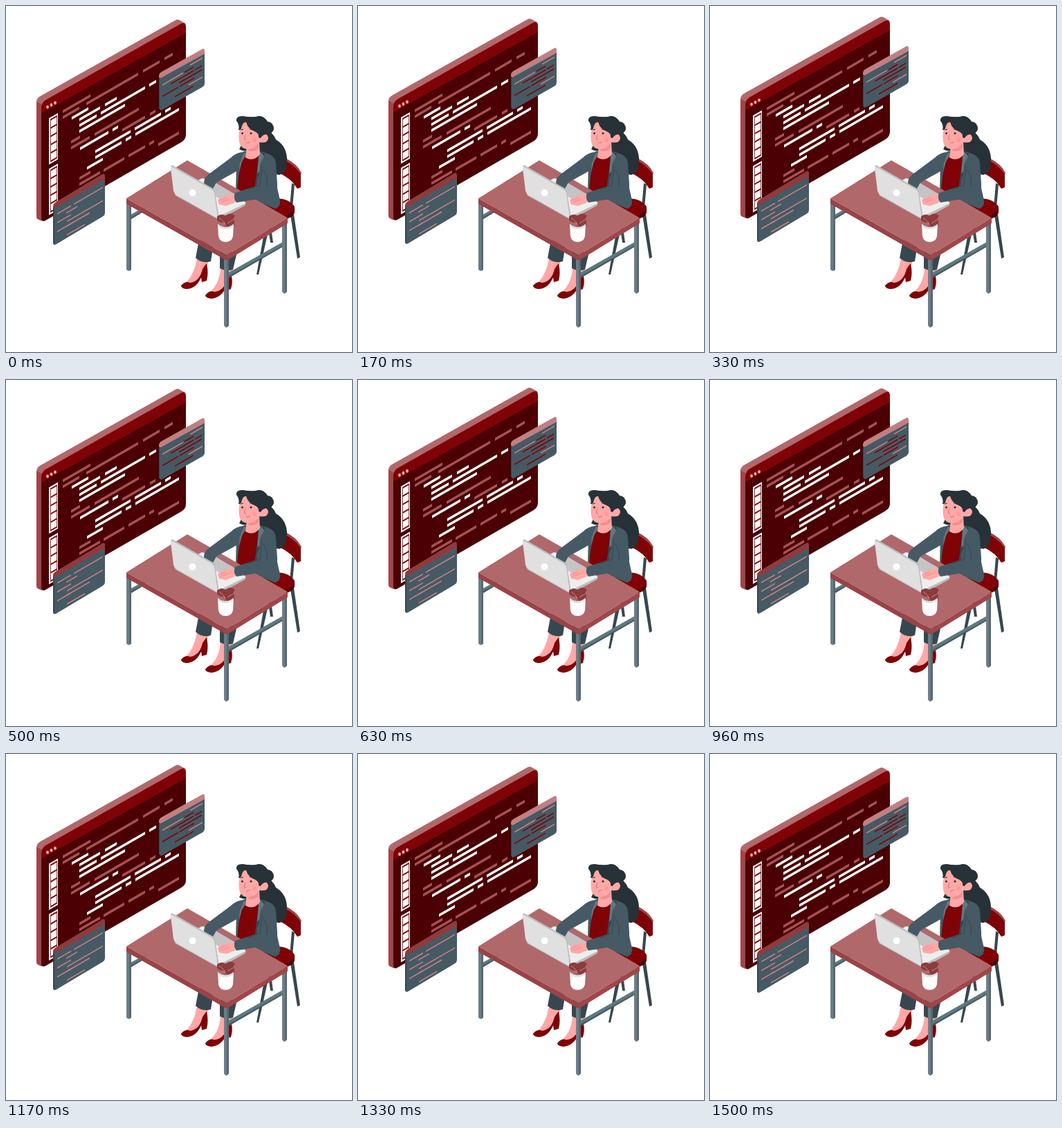
Recreate the animation shown at these times as an HTML page. Size 500 px wide and 500 px high, loop 1540 ms.

```html
<!DOCTYPE html>
<html lang="en">
<head>
<meta charset="utf-8">
<style>
html, body { margin: 0; width: 100%; height: 100%; overflow: hidden; background: #fff; }
svg { display: block; width: 100vw; height: 100vh; }
</style>
</head>
<body>
<svg viewBox="0 0 500 500">
  <g id="screens">
    <path fill="#b0686b" d="M44 139Q44 133 50 130L244 21Q248 18 252 21L259 25L255 40L52 160V311L46 308Q44 307 44 303Z"/>
    <path fill="#a04649" d="M44 138L51 142V310L46 308Q44 307 44 303Z"/>
    <path fill="#4b0003" d="M51 150L260 36V186Q260 193 253 197L57 310Q51 313 51 306Z"/>
    <path fill="#7f0306" d="M51 155V147Q51 140 57 136L252 26Q260 22 260 30V39Z"/>
    <g fill="#e8b9b9"><ellipse cx="60" cy="146" rx="1.9" ry="2.4"/><ellipse cx="65.5" cy="143" rx="1.9" ry="2.4"/><ellipse cx="71" cy="140" rx="1.9" ry="2.4"/></g>
    <g id="tiles"></g>
    <g id="code"></g>
    <path fill="#c17f81" d="M221 101Q221 97 225 95L284 62Q287 61 287 65V70L221 107Z"/>
    <path fill="#37474f" d="M221 103L223 104V150L221 148Z"/>
    <path fill="#455a64" d="M222 105L287 69V112Q287 115 284 117L226 150Q222 152 222 148Z"/>
    <g id="noteRight"></g>
    <path fill="#8e3b3e" d="M68 294V289Q68 286 71 284L139 243Q143 241 143 246V252Z"/>
    <path fill="#455a64" d="M69 293L143 250V299Q143 302 140 304L73 344Q68 347 68 341Z"/>
    <path fill="#37474f" d="M68 290L70 292V345L68 342Z"/>
    <g id="noteLeft"></g>
  </g>

  <g id="chair">
    <path fill="#37474f" d="M373 328L378 330L365 388H362ZM379 320L383 320L386 342H382ZM411 302L416 301L425 363L421 365ZM413 256L417 258L414 291H410Z"/>
    <path fill="#7f0306" d="M383 279Q407 275 417 290V297Q408 309 391 307L360 292Z"/>
    <path fill="#5a0205" d="M417 291V299Q414 307 402 308L399 304Q412 303 417 291Z"/>
    <path fill="#a04649" d="M402 219Q420 227 427 241L424 248L397 228Z"/>
    <path fill="#7f0306" d="M399 222Q416 228 426 243V262L421 264Q413 250 396 242Z"/>
  </g>

  <g id="legs">
    <path fill="#ffa8a7" d="M276 365L293 366Q290 383 280 396L267 402L260 400Q272 388 276 365ZM310 377L328 378Q326 395 317 409L303 416L295 413Q309 401 310 377Z"/>
    <path fill="#37474f" d="M279 338L300 344L296 369Q284 373 274 364ZM309 355L334 355L328 381Q317 384 309 379Z"/>
    <path fill="#7f0306" d="M253 404Q259 397 266 400Q280 398 284 380Q288 374 290 372Q293 386 290 397L283 399L282 392Q275 409 260 409Q253 408 253 404ZM288 418Q294 410 301 413Q315 412 320 394L326 390Q328 400 325 409L319 411L318 406Q312 421 297 423Q288 422 288 418Z"/>
  </g>

  <g id="body">
    <path fill="#263238" d="M372 176Q386 182 390 193Q407 203 406 225Q406 241 395 244Q374 242 364 223L356 190ZM339 193Q341 202 337 207Q343 211 352 208Z"/>
    <path fill="#455a64" d="M343 210Q352 207 367 210Q385 213 389 224L390 254L396 281Q397 290 389 293L332 268L333 226Z"/>
    <path fill="#7f0306" d="M343 217Q354 224 365 217L361 260L357 282L334 270Q335 240 343 217Z"/>
    <path fill="#37474f" d="M367 210L375 214L370 237L363 250L362 280L385 293L357 282L361 250Z"/>
    <path fill="#637780" d="M366 209L374 218L370 236L363 242L365 218ZM344 211L338 222L337 240L341 225L347 215Z"/>
    <path fill="#ffa8a7" d="M348 202L366 195L367 214Q358 226 346 219Z"/>
    <path fill="#f08f8f" d="M350 207Q361 205 365 199V205Q359 212 350 209Z"/>
    <path fill="#ffa8a7" d="M340 171Q335 184 337 196Q339 207 350 207Q362 205 366 197Q379 199 379 190Q377 183 370 185L367 170Q351 161 340 171Z"/>
    <path fill="#263238" d="M333 166Q332 159 342 159Q352 161 361 160Q371 156 378 167Q387 168 387 178Q386 182 380 186Q372 184 368 191L365 190Q366 184 359 181Q350 178 347 168Q342 167 340 177Q338 180 336 179Q338 172 333 166Z"/>
    <g fill="#263238"><circle cx="341.5" cy="184" r="1.5"/><circle cx="354" cy="184" r="1.6"/></g>
    <path fill="none" stroke="#263238" d="M339 179L343 178M352 178Q355 177 358 180"/>
    <path fill="none" stroke="#d96f70" d="M346 186L344 192L347 193M347 198Q350 199 353 196"/>
    <circle cx="359" cy="194" r="3" fill="#ff8d8e" opacity=".55"/>
  </g>

  <g id="desk">
    <path fill="#607780" d="M181 301L201 290V294L181 306ZM322 385L400 341V347L322 391Z"/>
    <path fill="#455a64" d="M181 305L201 294V296L181 308ZM322 390L400 346V348L322 393Z"/>
    <path fill="#6b7e87" d="M174 284H181V381L177 383L174 381ZM315 362H322V462L318 465L315 462ZM399 314H406V413L402 416L399 413Z"/>
    <path fill="#566a73" d="M178 286H181V381L178 383ZM319 364H322V462L319 464ZM403 312H406V413L403 415Z"/>
    <path fill="#b0686b" d="M174 278L262 223L407 306L319 360Z"/>
    <path fill="#9a4346" d="M174 278L319 360V368L174 286Z"/>
    <path fill="#a04649" d="M319 360L407 306V314L319 368Z"/>
  </g>

  <g id="laptop">
    <path fill="#eee" d="M244 272L281 250Q284 248 287 250L345 283Q348 285 345 287L306 306Z"/>
    <path fill="#bdbdbd" d="M306 305L346 285V288L308 309L304 307Z"/>
    <path fill="#c4c4c4" d="M280 261L297 252L331 272L314 282Z"/>
    <path fill="#ffa8a7" d="M289 249L298 254L300 263L293 267L286 260Z"/>
    <path fill="#455a64" d="M344 211Q333 211 324 220L293 243Q285 249 286 259L299 264L304 255L333 239Z"/>
    <path fill="#ffa8a7" d="M333 273L321 273Q309 276 306 281L308 287L318 289L331 284Z"/>
    <path fill="none" stroke="#e98384" stroke-width=".8" d="M309 281L318 277M311 284L322 279"/>
    <path fill="#455a64" d="M375 213Q389 215 390 228L392 257Q393 271 382 276L333 284Q328 278 331 270L365 259L367 229Z"/>
    <path fill="none" stroke="#37474f" d="M370 231L367 259L349 266M371 236Q379 246 377 261"/>
    <path fill="#bdbdbd" d="M238 233Q238 229 242 231L298 263Q301 265 302 268L308 306L304 307L245 274Z"/>
    <path fill="#e0e0e0" d="M238 234Q238 231 241 233L297 265Q300 267 301 270L306 307L246 273Q243 271 242 267Z"/>
    <circle cx="269.5" cy="270" r="5" fill="#fff"/>
  </g>

  <g id="cup">
    <path fill="#8e3b3e" d="M305 304Q311 299 317 303Q325 297 331 303L328 308Q332 313 329 319L315 321L317 313Q308 314 305 309Z"/>
    <path fill="none" stroke="#c78a8c" d="M308 306Q316 311 318 320M328 309L320 314"/>
    <path fill="#fff" d="M306 315Q317 325 329 315L328 333Q326 341 317 341Q309 341 307 333Z"/>
    <path fill="#e0e0e0" d="M306 315Q317 324 329 315V318Q317 327 306 318Z"/>
  </g>
</svg>
<script>
const PERIOD = 1540, LIFT = 9, SLOPE = 0.577;
const PINK = '#a65356', PALE = '#c98082', WHITE = '#fff', RED = '#7f0306';
const byId = id => document.getElementById(id);
const rect = (x, y, w, h, fill) => `<rect x="${x}" y="${y}" width="${w}" height="${h}" fill="${fill}"/>`;

// Fills a group whose contents follow the slanted plane.
function fillSlanted(id, markup) {
  byId(id).setAttribute('transform', `matrix(1 ${-SLOPE} 0 1 0 0)`);
  byId(id).innerHTML = markup;
}

// Each row is [line number, colour, start, end, start, end, ...].
function bars(id, top, gap, height, rows) {
  fillSlanted(id, rows.map(([line, fill, ...ends]) => {
    let out = '';
    for (let i = 0; i < ends.length; i += 2)
      out += rect(ends[i], top + line * gap - height / 2, ends[i + 1] - ends[i], height, fill);
    return out;
  }).join(''));
}

bars('code', 200, 8.5, 4, [
  [0, PINK, 82, 122],
  [1, PINK, 82, 106, 116, 191, 198, 222, 229, 241],
  [2, WHITE, 95, 119],
  [3, WHITE, 106, 136, 143, 160],
  [4, WHITE, 106, 131, 137, 201, 207, 217],
  [5, WHITE, 106, 172],
  [6, PINK, 94, 107],
  [7, PINK, 94, 121, 128, 192],
  [8, WHITE, 107, 148, 154, 162],
  [9, PINK, 168, 201, 208, 216],
  [10, WHITE, 129, 180, 186, 224, 230, 238],
  [11, WHITE, 129, 167, 173, 181, 187, 250],
  [12, WHITE, 117, 140],
  [13, PINK, 106, 122],
  [14, PINK, 106, 136, 141, 171, 177, 201, 207, 214],
  [15, PINK, 220, 250]
]);

bars('noteRight', 239, 5.5, 1.8, [
  [0, PALE, 266, 284],
  [1, PALE, 226, 256],
  [1, RED, 258, 271],
  [2, RED, 238, 271, 273, 283],
  [3, RED, 250, 283],
  [4, RED, 226, 249, 251, 272],
  [5, PALE, 264, 284],
  [6, RED, 244, 271]
]);

bars('noteLeft', 343, 6.4, 1.8, [
  [0, PALE, 74, 94, 98, 140],
  [1, PALE, 87, 103],
  [2, PALE, 74, 94],
  [3, PALE, 88, 140],
  [4, PALE, 74, 94, 88, 121],
  [6, PALE, 88, 114]
]);

// A sidebar strip of white tiles in a thin frame.
function strip(top, count) {
  let out = rect(62, top, 13, count * 12 + 7, WHITE);
  for (let i = 0; i <= count; i++)
    out += rect(64.5, top + 2.5 + i * 12, 9, 2.2, RED);
  return out + rect(64, top + 2.5, 0.8, count * 12 + 2, RED) + rect(73, top + 2.5, 0.8, count * 12 + 2, RED);
}
fillSlanted('tiles', strip(198, 5) + strip(271, 5));

const screens = byId('screens');
function draw(now) {
  const phase = (now % PERIOD + 20) / PERIOD * 2 * Math.PI;
  screens.setAttribute('transform', `translate(0 ${-LIFT * (1 - Math.cos(phase)) / 2})`);
  requestAnimationFrame(draw);
}
draw(0);
</script>
</body>
</html>
```
